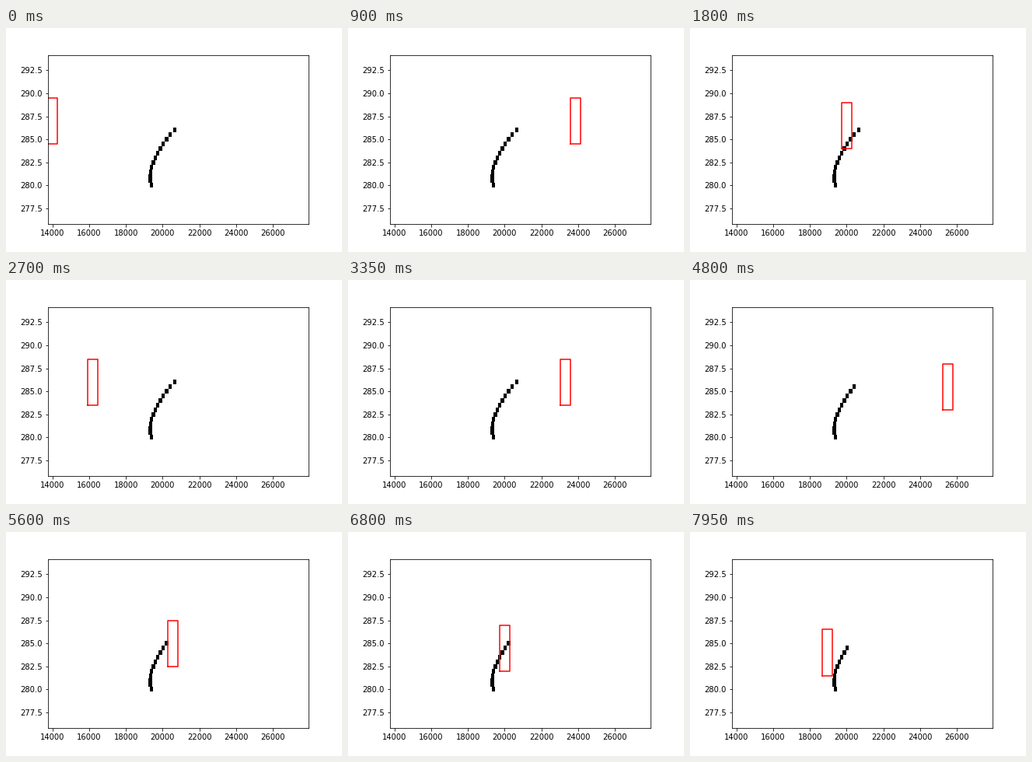
Recreate the animation shown at these times as a matplotlib script. Size 432x288 px, loop 8 s.

```python
import matplotlib.pyplot as plt
from matplotlib.animation import FuncAnimation
from matplotlib.patches import Rectangle

FRAMES, INTERVAL = 160, 50
COLS = 25                      # window positions per row
X0, WIN_W = 13732.4, 547.0     # left edge and width of the window
TOP, WIN_H, STEP = 289.5, 5.0, 0.5
CELL_W, CELL_H = 190, 0.5
DROP_ROW, DROP_COL = 3, 12     # where the topmost cell disappears

# x of each cell, from y = 280 upwards
CELL_X = [19390, 19317, 19317, 19338, 19390, 19487, 19601,
          19728, 19868, 20025, 20207, 20406, 20652]

plt.rcParams.update({"font.family": "DejaVu Sans", "font.size": 10})
fig = plt.figure(figsize=(6, 4), dpi=72, facecolor="white")
fig.subplots_adjust(left=0.125, right=0.9, bottom=0.125, top=0.88)
ax = fig.add_subplot()

cells = []
for i, x in enumerate(CELL_X):
    y = 280 + STEP * i
    cell = Rectangle((x - CELL_W / 2, y - CELL_H / 2), CELL_W, CELL_H,
                     facecolor="black", linewidth=0)
    cells.append(ax.add_patch(cell))
cells.reverse()                # topmost first

window, = ax.plot([], [], color="red", linewidth=1.5)
ax.set_xlim(13754, 27940)
ax.set_ylim(275.804, 294.184)


def update(frame):
    row, col = divmod(frame, COLS)
    left, top = X0 + col * WIN_W, TOP - row * STEP
    right, bottom = left + WIN_W, top - WIN_H
    window.set_data([left, right, right, left, left],
                    [bottom, bottom, top, top, bottom])
    for n, cell in enumerate(cells):
        cell.set_visible(frame < (DROP_ROW + n) * COLS + DROP_COL)
    return [window, *cells]


anim = FuncAnimation(fig, update, frames=FRAMES, interval=INTERVAL,
                     repeat=True, repeat_delay=0, blit=False)
plt.show()
```
